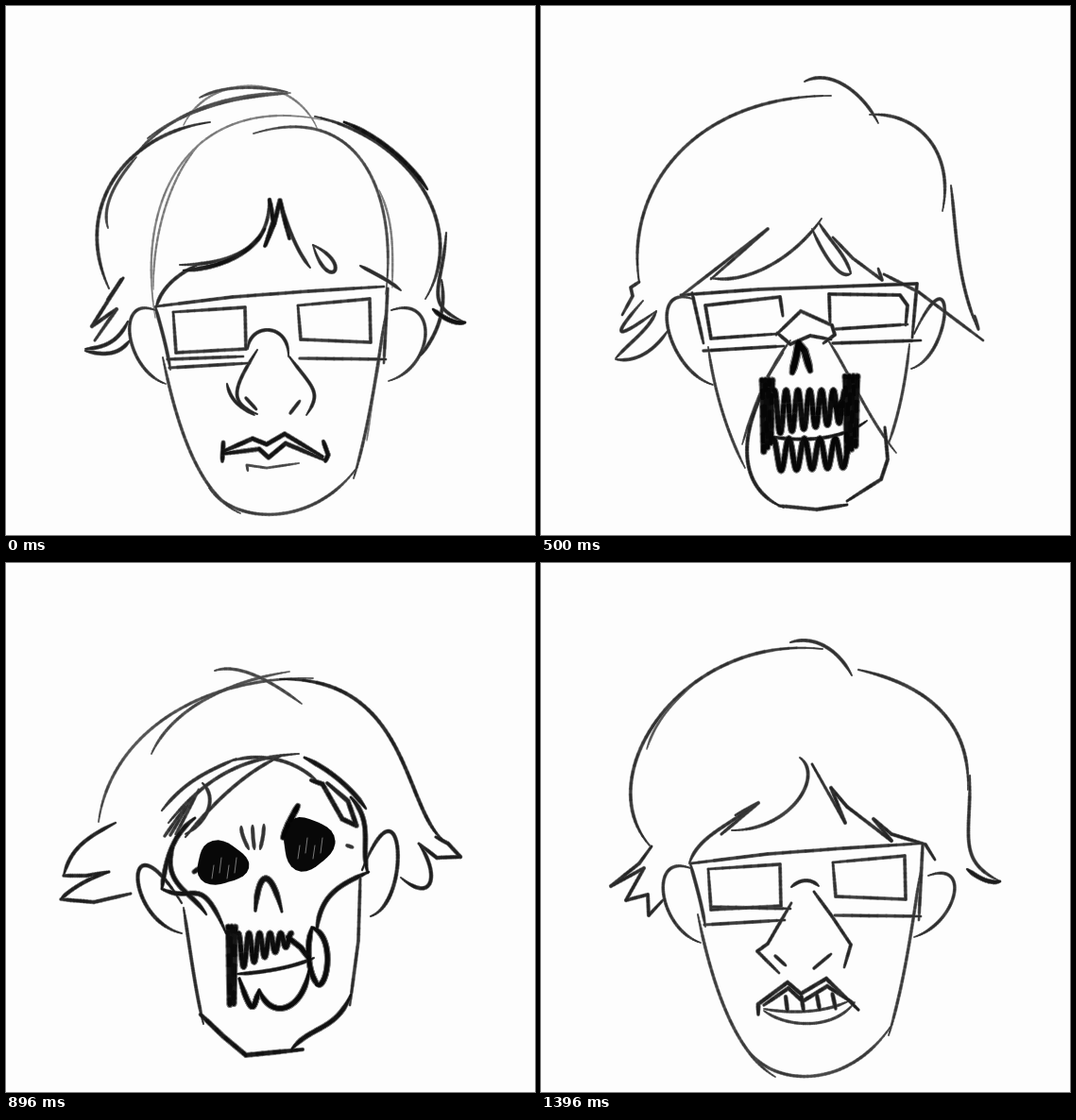
Animation of 560x560 px, one loop 1.5 s. Source, as an HTML page with a canvas:

```html
<!DOCTYPE html>
<html lang="en">
<head>
<meta charset="utf-8">
<title>Face to skull</title>
<style>
html, body { margin: 0; width: 100%; height: 100%; overflow: hidden; background: #fdfdfd; }
canvas { display: block; width: 100vw; height: 100vh; }
</style>
</head>
<body>
<canvas id="stage" width="560" height="560"></canvas>
<script>
const ctx = document.getElementById('stage').getContext('2d');
const PAPER = '#fdfdfd', TAU = Math.PI * 2;
let width, tone;

const mix = (a, b, t) => a + (b - a) * t;
const grey = v => `rgb(${v},${v},${v})`;

function pen(w, t) { width = w; tone = t; }

// Pencil mark along at(t): a soft wide pass, then a grainy core.
function mark(at, steps, taper) {
  ctx.lineCap = ctx.lineJoin = 'round';
  for (const [spread, fade] of [[1.5, 0.45], [1.05, 0]]) {
    let from = at(0);
    for (let s = 1; s <= steps; s++) {
      const u = s / steps, to = at(u);
      const end = Math.min(1, Math.min(u, 1 - u) * 7);
      const grain = 9 * Math.sin(s * 2.3 + to[0]);
      ctx.strokeStyle = grey(Math.round(mix(tone, 253, fade) + grain));
      ctx.lineWidth = width * spread * mix(1 - taper, 1, end);
      ctx.beginPath();
      ctx.moveTo(...from);
      ctx.lineTo(...to);
      ctx.stroke();
      from = to;
    }
  }
}

function bez(x0, y0, x1, y1, x2, y2, x3, y3) {
  const cubic = (a, b, c, d, t) => {
    const r = 1 - t;
    return r * r * r * a + 3 * r * r * t * b + 3 * r * t * t * c + t * t * t * d;
  };
  mark(t => [cubic(x0, x1, x2, x3, t), cubic(y0, y1, y2, y3, t)], 48, 0.5);
}

function line(...p) {
  const n = p.length / 2 - 1;
  mark(t => {
    const i = Math.min(n - 1, Math.floor(t * n + 1e-6)), f = t * n - i;
    return [mix(p[2 * i], p[2 * i + 2], f), mix(p[2 * i + 1], p[2 * i + 3], f)];
  }, n * 10, 0.25);
}

// Up and down scribble whose lower edge may slope.
function scribble(x0, x1, top, low0, low1, n) {
  mark(t => [mix(x0, x1, t), mix(top, mix(low0, low1, t), 0.5 - 0.5 * Math.cos(TAU * n * t))], n * 24, 0);
}

// Positive bulge opens to the right, negative to the left.
function ear(x0, y0, x1, y1, bulge, lift = 17) {
  bez(x0, y0, x0 - bulge, y0 - lift, x1 - bulge, y1 - 15, x1, y1);
}

function lens(x, y, w, h, rise, drop) {
  line(x, y, x + w, y - rise, x + w + 1, y + h + drop, x + 3, y + h, x, y);
}

function socket(x, y, rx, ry, turn) {
  ctx.fillStyle = grey(8);
  ctx.beginPath();
  for (let a = 0; a < TAU; a += 0.2) {
    const r = 1 + 0.1 * Math.sin(3 * a + turn);
    ctx.lineTo(x + rx * r * Math.cos(a), y + ry * r * Math.sin(a));
  }
  ctx.fill();
  ctx.globalCompositeOperation = 'source-over';
  ctx.strokeStyle = grey(120);
  ctx.lineWidth = 1;
  for (let i = 0; i < 4; i++) {
    ctx.beginPath();
    ctx.moveTo(x - 8 + i * 8, y + 2 - i % 2 * 8);
    ctx.lineTo(x - 10 + i * 8, y + 16 - i % 2 * 6);
    ctx.stroke();
  }
  ctx.globalCompositeOperation = 'darken';
}

// Parts shared by the two living faces.
function glasses() {
  pen(2.7, 55);
  line(159, 318, 240, 308, 320, 302, 400, 297);
  bez(158, 318, 164, 340, 170, 360, 174, 385);
  lens(177, 324, 76, 43, 5, -4);
  lens(309, 317, 76, 36, 7, 3);
  line(173, 383, 258, 378);
  line(311, 373, 402, 374);
  line(404, 299, 400, 378);
}

function jaw(low) {
  pen(2.5, 65);
  bez(166, 372, 178, 430, 200, 515, 248, low - 4);
  bez(215, 510, 242, low + 8, 325, low + 12, 372, 488);
  bez(368, 500, 386, 440, 394, 375, 402, 325);
}

function calm() {
  pen(1.7, 125);
  bez(188, 126, 215, 70, 305, 70, 330, 131);
  bez(158, 330, 135, 190, 205, 90, 342, 122);
  bez(156, 300, 155, 235, 178, 172, 208, 143);
  bez(395, 195, 412, 230, 409, 265, 409, 298);
  bez(382, 460, 386, 430, 390, 400, 396, 375);
  pen(2.3, 75);
  bez(205, 97, 230, 84, 265, 84, 298, 91);
  bez(133, 163, 170, 112, 235, 92, 301, 92);
  bez(150, 140, 190, 110, 240, 95, 298, 93);
  bez(108, 235, 100, 210, 120, 180, 138, 160);
  bez(262, 135, 375, 100, 415, 200, 402, 305);
  pen(2.8, 50);
  bez(109, 299, 70, 215, 125, 135, 216, 123);
  bez(327, 117, 430, 140, 490, 235, 444, 310);
  bez(466, 240, 462, 300, 440, 315, 486, 335);
  bez(461, 290, 468, 330, 450, 355, 439, 370);
  bez(278, 205, 282, 260, 230, 274, 184, 274);
  bez(203, 274, 175, 287, 163, 303, 159, 319);
  bez(292, 212, 300, 240, 310, 262, 322, 277);
  bez(325, 253, 370, 275, 340, 305, 325, 253);
  bez(375, 275, 390, 283, 405, 290, 418, 301);
  pen(3.7, 25);
  bez(358, 123, 400, 140, 430, 170, 446, 194);
  bez(486, 335, 475, 337, 462, 330, 452, 321);
  bez(274, 236, 258, 266, 220, 278, 188, 280);
  line(279, 205, 283, 228, 275, 253);
  line(300, 246, 290, 206, 284, 230, 274, 254);
  pen(3, 45);
  line(124, 288, 108, 311, 122, 290, 91, 339, 117, 321, 94, 354);
  bez(129, 334, 118, 358, 100, 362, 84, 363);
  bez(84, 365, 110, 372, 122, 366, 131, 354);
  pen(2.5, 55);
  ear(158, 322, 169, 400, 43);
  ear(408, 322, 405, 397, -50);
  glasses();
  line(171, 374, 251, 371);
  jaw(541);
  pen(2.7, 45);
  bez(256, 363, 258, 335, 300, 335, 299, 371);
  bez(266, 364, 240, 405, 235, 420, 266, 432);
  bez(234, 400, 238, 420, 250, 425, 263, 433);
  bez(299, 370, 325, 405, 335, 408, 318, 433);
  line(254, 415, 265, 427);
  line(301, 431, 311, 418);
  pen(3.6, 25);
  line(230, 462, 229, 482);
  line(231, 471, 261, 458, 276, 464, 295, 453, 335, 477);
  line(230, 474, 268, 469, 278, 478, 296, 463, 336, 480);
  line(336, 461, 341, 475, 338, 482);
  pen(2, 75);
  line(256, 492, 255, 486, 276, 489, 310, 484);
}

function grin() {
  pen(2.7, 55);
  bez(115, 299, 50, 225, 150, 75, 298, 91);
  bez(264, 84, 290, 76, 315, 92, 329, 119);
  bez(336, 113, 405, 128, 455, 165, 452, 240);
  bez(454, 225, 455, 290, 440, 315, 486, 337);
  bez(274, 206, 300, 225, 265, 283, 202, 283);
  bez(157, 318, 166, 290, 195, 280, 230, 254);
  pen(1.9, 90);
  bez(112, 197, 120, 170, 138, 148, 160, 130);
  pen(3.4, 35);
  bez(486, 337, 475, 340, 462, 333, 451, 324);
  pen(2.8, 45);
  line(191, 287, 230, 254, 206, 267);
  line(287, 213, 322, 275, 307, 238, 324, 258, 371, 294, 352, 271, 371, 287, 407, 298, 417, 314);
  line(117, 300, 104, 318, 74, 342, 109, 323, 90, 357, 113, 351, 114, 373, 129, 357);
  pen(2.5, 55);
  ear(158, 323, 169, 402, 45);
  ear(410, 331, 395, 396, -46);
  glasses();
  line(182, 364, 264, 366);
  jaw(548);
  pen(2.7, 45);
  bez(265, 343, 275, 334, 286, 334, 294, 342);
  line(265, 360, 240, 403, 229, 411, 252, 434);
  line(289, 348, 308, 374, 328, 404, 321, 428);
  line(248, 416, 259, 426);
  line(289, 429, 307, 414);
  pen(3.2, 40);
  line(230, 478, 230, 467, 261, 444, 275, 456, 302, 440, 336, 473);
  line(236, 468, 262, 450, 277, 464, 303, 448, 331, 466);
  for (let i = 0; i < 4; i++) line(259 + i * 16.5, 459 - i, 261 + i * 17, 475 - i);
  pen(2.3, 65);
  bez(236, 472, 262, 477, 300, 477, 327, 463);
  bez(236, 474, 260, 492, 310, 495, 332, 465);
}

function rot() {
  pen(2.6, 55);
  bez(104, 293, 88, 190, 165, 95, 307, 95);
  bez(279, 80, 305, 66, 340, 90, 357, 124);
  bez(348, 115, 400, 112, 438, 155, 425, 217);
  bez(434, 190, 440, 240, 440, 290, 463, 343);
  line(363, 284, 400, 303, 468, 354);
  line(463, 342, 459, 328);
  line(104, 292, 95, 298, 97, 307, 86, 327);
  // side tuft and fringe
  bez(108, 312, 70, 355, 82, 352, 122, 323);
  bez(122, 323, 115, 342, 95, 355, 79, 373);
  bez(79, 374, 103, 378, 122, 362, 134, 344);
  line(148, 307, 240, 236, 180, 289);
  bez(180, 288, 220, 295, 270, 265, 297, 225);
  bez(287, 236, 302, 270, 318, 290, 328, 283);
  bez(328, 283, 322, 262, 305, 248, 294, 229);
  line(309, 245, 330, 267, 361, 290, 357, 278);
  ear(160, 310, 182, 401, 48);
  ear(395, 347, 392, 384, -45, 95);
  // glasses
  pen(2.8, 45);
  line(148, 306, 230, 300, 398, 294, 393, 351);
  line(160, 304, 172, 357);
  line(172, 365, 257, 360);
  line(256, 328, 253, 308, 174, 317, 180, 352, 251, 347);
  line(306, 335, 305, 305, 380, 306, 388, 317, 386, 338);
  line(312, 342, 388, 337);
  line(309, 357, 402, 354);
  line(249, 348, 275, 323, 308, 338, 311, 348, 299, 357);
  line(250, 346, 264, 358, 285, 349, 307, 353);
  pen(6, 12);
  line(273, 356, 270, 372, 266, 388);
  line(272, 357, 279, 365, 285, 386);
  // cheeks and jaw
  pen(2.3, 65);
  bez(177, 361, 183, 405, 196, 450, 216, 489);
  bez(390, 358, 386, 400, 378, 435, 368, 463);
  bez(264, 354, 240, 385, 225, 425, 213, 464);
  bez(304, 354, 325, 385, 345, 435, 376, 473);
  line(256, 367, 240, 392, 247, 404);
  pen(2.9, 40);
  bez(241, 398, 210, 450, 206, 510, 257, 531);
  line(252, 529, 292, 533, 324, 528);
  line(364, 446, 367, 480, 360, 501, 324, 524);
  // teeth
  pen(4.8, 14);
  scribble(234, 245, 396, 474, 460, 3);
  scribble(322, 335, 392, 474, 464, 3);
  scribble(247, 322, 407, 453, 440, 6);
  scribble(246, 328, 458, 492, 488, 5);
  line(309, 418, 314, 428, 318, 418);
  pen(2.8, 30);
  bez(238, 455, 275, 462, 318, 460, 345, 439);
}

function skull() {
  // hair
  pen(2.4, 75);
  bez(98, 274, 110, 185, 200, 120, 325, 122);
  bez(154, 202, 175, 155, 235, 125, 300, 115);
  bez(221, 114, 248, 105, 285, 128, 313, 149);
  pen(3, 38);
  bez(290, 123, 430, 120, 420, 265, 466, 296);
  line(455, 290, 468, 297, 481, 311, 456, 312, 437, 297);
  bez(437, 297, 460, 330, 452, 362, 418, 333);
  bez(116, 275, 80, 293, 68, 305, 61, 331);
  line(61, 331, 85, 331, 109, 327);
  bez(109, 327, 85, 334, 65, 348, 58, 356);
  line(58, 356, 93, 359, 132, 350);
  ear(186, 360, 186, 392, 62, 100);
  ear(377, 325, 386, 374, -44, 110);
  // cranium
  pen(2.8, 55);
  bez(165, 262, 190, 230, 215, 220, 244, 207);
  bez(172, 275, 210, 230, 245, 206, 310, 202);
  bez(190, 290, 220, 253, 255, 220, 290, 205);
  bez(240, 209, 275, 200, 310, 210, 332, 234);
  bez(208, 233, 225, 250, 212, 275, 190, 287);
  for (let i = 0; i < 3; i++) line(168 + i * 6, 289 - i, 190 + i * 7, 258 - i * 9);
  pen(3.8, 28);
  bez(316, 206, 345, 220, 366, 239, 381, 260);
  line(323, 230, 335, 234, 356, 271, 371, 278, 362, 252, 340, 233);
  bez(365, 248, 390, 275, 375, 300, 383, 328);
  bez(200, 270, 172, 290, 168, 325, 165, 345);
  bez(180, 290, 160, 340, 195, 345, 212, 372);
  bez(165, 345, 200, 362, 205, 325, 233, 392);
  bez(329, 390, 332, 350, 355, 340, 384, 327);
  // eyes, brow, nose
  socket(228, 318, 27, 23, 1);
  socket(319, 297, 27, 28, 2);
  line(199, 327, 212, 318);
  pen(5, 12);
  line(309, 257, 299, 276, 293, 291);
  pen(2.8, 60);
  for (let i = 0; i < 3; i++) bez(249 + i * 12, 279 - i, 249 + i * 12, 287, 253 + i * 9, 295, 257 + i * 6, 303);
  line(361, 299, 367, 301);
  pen(4.6, 25);
  bez(264, 368, 267, 325, 280, 320, 292, 369);
  // jaw
  pen(2.7, 50);
  bez(188, 365, 195, 410, 200, 450, 209, 488);
  line(375, 334, 373, 400, 364, 468);
  pen(3.9, 25);
  line(206, 478, 230, 501, 254, 521, 314, 515);
  bez(303, 514, 323, 490, 350, 495, 365, 457);
  // teeth
  pen(4.5, 18);
  scribble(235, 243, 385, 468, 466, 2);
  scribble(246, 302, 392, 430, 404, 5);
  line(298, 396, 312, 407, 322, 420);
  bez(247, 440, 262, 485, 262, 470, 268, 452);
  bez(268, 452, 280, 485, 315, 475, 321, 430);
  bez(324, 386, 350, 395, 340, 455, 328, 446);
  bez(324, 386, 316, 410, 322, 440, 331, 447);
  pen(3, 30);
  bez(245, 435, 270, 434, 305, 428, 326, 418);
}

const cuts = [[0, calm], [240, grin], [500, rot], [740, skull], [1000, rot], [1240, grin]];
const LOOP = 1500;
let shown = null;

function tick() {
  const t = performance.now() % LOOP;
  const pose = cuts.filter(c => c[0] <= t).pop()[1];
  if (pose !== shown) {
    shown = pose;
    ctx.globalCompositeOperation = 'source-over';
    ctx.fillStyle = PAPER;
    ctx.fillRect(0, 0, 560, 560);
    ctx.globalCompositeOperation = 'darken';
    pose();
  }
  requestAnimationFrame(tick);
}
tick();
</script>
</body>
</html>
```
